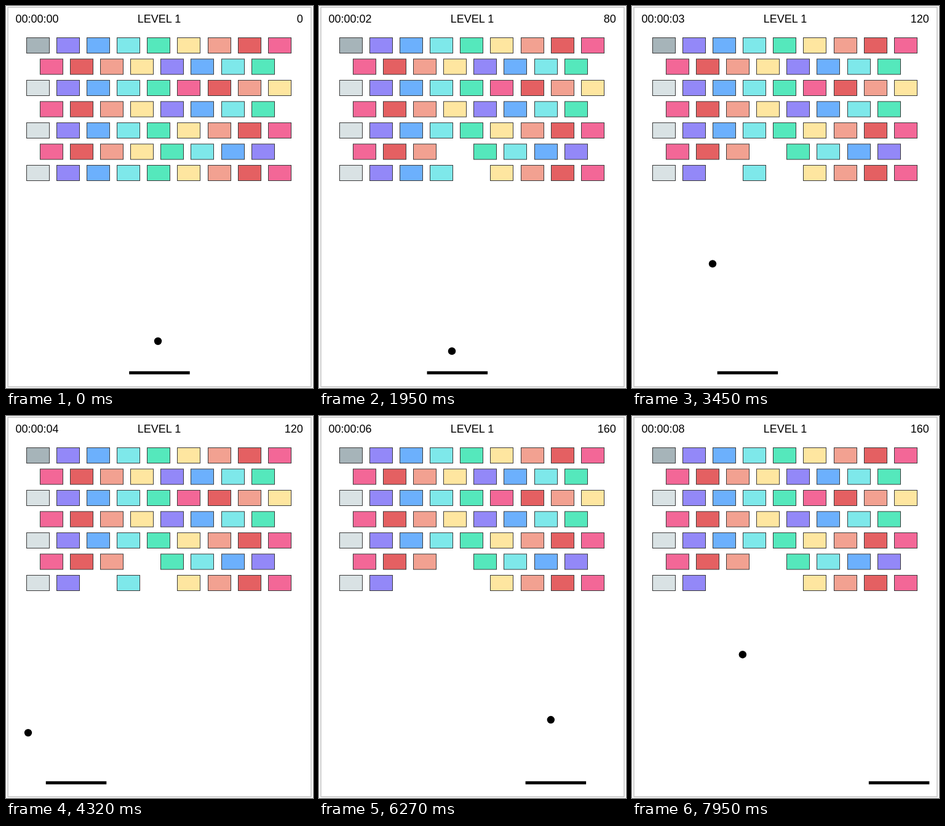
An HTML page for the animation above (8000 ms loop, 499 px wide and 620 px high).

```html
<!DOCTYPE html>
<html lang="en">
<head>
<meta charset="utf-8">
<title>Brick game</title>
<style>
  html, body { margin: 0; width: 100%; height: 100%; overflow: hidden; background: #fff; }
  svg { display: block; width: 499px; height: 620px; }
  text { font: 18px "Liberation Sans", Arial, sans-serif; fill: #000; }
  .brick { stroke: #3a3a3a; stroke-width: 1; }
</style>
</head>
<body>
<svg viewBox="0 0 499 620">
  <rect x="3" y="2" width="493" height="616" fill="#fff" stroke="#c6c6c6" stroke-width="1.6"/>
  <text id="clock" x="15.5" y="27">00:00:00</text>
  <text x="249" y="27" text-anchor="middle">LEVEL 1</text>
  <text id="score" x="482.7" y="27" text-anchor="end">0</text>
  <g id="wall"></g>
  <rect id="paddle" y="592.8" width="98.5" height="5"/>
  <circle id="ball" r="6.2"/>
</svg>
<script>
const LOOP = 8000, FPS = 22, LAST_STEP = 175;
const LEFT = 8.95, RIGHT = 491, FLOOR = 584.5, RADIUS = 6.2;
const BRICK = { width: 37, height: 25 };
const $ = id => document.getElementById(id);

const COLORS = {
  g: '#a6b4b9', w: '#d9e2e4', p: '#9388f8', b: '#6cb0fd', c: '#7ee8ea',
  e: '#55e8bc', y: '#fee6a0', o: '#f2a191', r: '#e46062', k: '#f36797'
};
const ROWS = ['gpbceyork', 'kroypbce', 'wpbcekroy', 'kroypbce', 'wpbceyork', 'kroyecbp', 'wpbceyork'];

// One flight per paddle bounce: launch angle, height of the rebound, speed per step
const FLIGHTS = [
  { angle: -2.98, top: 254.5, speed: 13.86 },
  { angle: -11.15, top: 289, speed: 13.86 },
  { angle: -41.5, top: 280.4, speed: 13.86 },
  { angle: 60.2, top: 289, speed: 14.08 }
];

// Held arrow keys: first step, signed number of repeats
const KEYS = [[28, -2], [62, -3], [80, -6], [99, 10], [128, 16]];
const REPEAT = 0.8, PADDLE_STEP = 12.31;

const bounceSides = x => x < LEFT ? 2 * LEFT - x : x > RIGHT ? 2 * RIGHT - x : x;

function ballAt(step) {
  let x = 247, y = 544;
  for (const { angle, top, speed } of FLIGHTS) {
    const vx = speed * Math.sin(angle * Math.PI / 180);
    const vy = speed * Math.cos(angle * Math.PI / 180);
    const duration = (y + FLOOR - 2 * top) / vy;
    const t = Math.min(step, duration);
    x = bounceSides(x + vx * t);
    if (step < duration) return { x, y: top + Math.abs(y - vy * t - top) };
    y = FLOOR;
    step -= duration;
  }
  return { x, y };
}

function paddleAt(step) {
  let presses = 0;
  for (const [first, count] of KEYS) {
    const done = Math.max(0, Math.floor((step - first) / REPEAT));
    presses += Math.sign(count) * Math.min(done, Math.abs(count));
  }
  return 200.2 + PADDLE_STEP * presses;
}

function makeBrick(color, row, col) {
  const x = (row % 2 ? 55.5 : 33.5) + Math.floor(49.18 * col);
  const y = 51.5 + 34.5 * row;
  const node = document.createElementNS('http://www.w3.org/2000/svg', 'rect');
  const attrs = { class: 'brick', fill: COLORS[color], x, y, ...BRICK };
  for (const name in attrs) node.setAttribute(name, attrs[name]);
  $('wall').append(node);
  return { x, y, node, hitAt: Infinity };
}

function touches(ball, brick) {
  const dx = ball.x - Math.max(brick.x, Math.min(ball.x, brick.x + BRICK.width));
  const dy = ball.y - Math.max(brick.y, Math.min(ball.y, brick.y + BRICK.height));
  return Math.hypot(dx, dy) <= RADIUS;
}

const bricks = ROWS.flatMap((row, r) => [...row].map((color, c) => makeBrick(color, r, c)));

// Follow the ball once to learn when each brick falls
for (let step = 0; step <= LAST_STEP; step += 0.05) {
  const ball = ballAt(step);
  for (const brick of bricks) {
    if (touches(ball, brick)) brick.hitAt = Math.min(brick.hitAt, step);
  }
}

function draw(time) {
  const step = Math.min(LAST_STEP, Math.floor((time + 5) * FPS / 1000 + 1e-6));
  const ball = ballAt(step);
  let score = 0;
  for (const { node, hitAt } of bricks) {
    const hit = step >= hitAt;
    node.style.display = hit ? 'none' : '';
    if (hit) score += 40;
  }
  $('clock').textContent = '00:00:0' + Math.floor(step / FPS + 0.5);
  $('score').textContent = score;
  $('ball').setAttribute('cx', ball.x);
  $('ball').setAttribute('cy', ball.y);
  $('paddle').setAttribute('x', paddleAt(step));
}

const start = performance.now();
function tick() {
  draw((performance.now() - start) % LOOP);
  requestAnimationFrame(tick);
}
tick();
</script>
</body>
</html>
```
